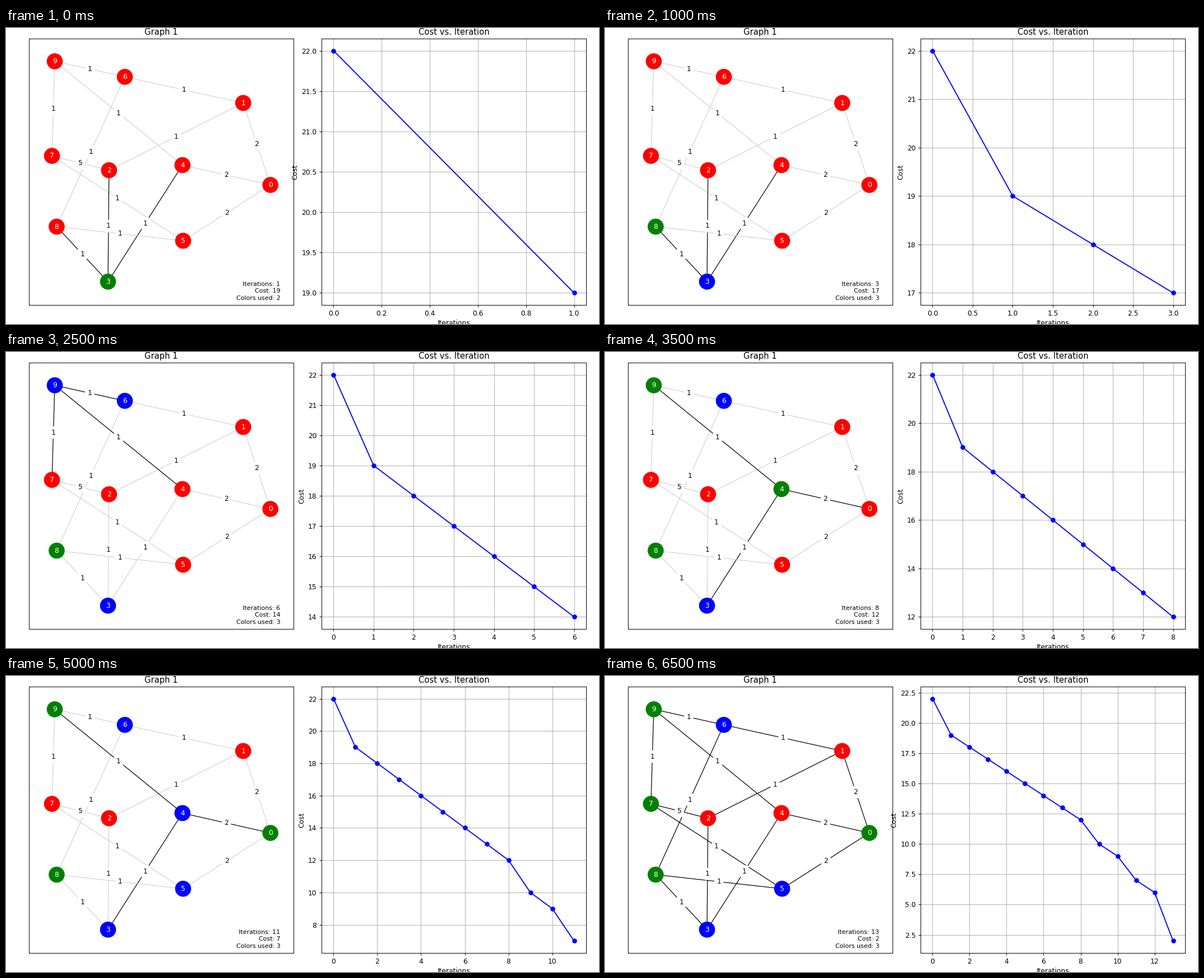
Recreate the animation shown at these times as a matplotlib script. Size 1058 by 529 pixels, loop 7 s.

```python
import matplotlib.pyplot as plt
from matplotlib.animation import FuncAnimation

plt.rcParams["font.family"] = "DejaVu Sans"

WIDTH, HEIGHT = 1058, 529
TOP, BOTTOM = 19, 495
GRAPH_SPAN = (41, 513)
COST_SPAN = (563, 1035)

# Free layout of the ten nodes: key points in stage pixels, y pointing down
NODES = [(471.7, 280.5), (423.2, 134), (183.8, 254.2), (182, 453.3),
         (314.8, 245), (316, 380.2), (212, 87.3), (82, 228.5),
         (90.4, 355), (87, 59.5)]

# Petersen graph: outer ring, spokes and inner star
EDGES = [edge for i in range(5) for edge in
         ((i, (i + 1) % 5), (i, i + 5), (i + 5, (i + 2) % 5 + 5))]

PALETTE = {"r": "red", "g": "green", "b": "blue"}
# One recolouring per iteration: node, then its new colour
MOVES = "3g 8g 3b 6g 6b 9b 9g 4g 0g 5b 4b 4r 7g".split()


def weight(a, b):
    if {a, b} == {2, 7}:
        return 5
    return 2 if 0 in (a, b) else 1


def conflict_cost(colors):
    return sum(weight(a, b) for a, b in EDGES if colors[a] == colors[b])


states = [["red"] * len(NODES)]
for node, key in MOVES:
    colors = list(states[-1])
    colors[int(node)] = PALETTE[key]
    states.append(colors)
costs = [conflict_cost(colors) for colors in states]

fig = plt.figure(figsize=(12, 6), dpi=WIDTH / 12, facecolor="white")


def add_panel(left, right):
    return fig.add_axes([left / WIDTH, 1 - BOTTOM / HEIGHT,
                         (right - left) / WIDTH, (BOTTOM - TOP) / HEIGHT])


graph_ax = add_panel(*GRAPH_SPAN)
cost_ax = add_panel(*COST_SPAN)


def centered_text(x, y, value, **style):
    graph_ax.text(x, y, str(value), fontsize=10,
                  ha="center", va="center", **style)


def draw_graph(iteration, finished):
    ax = graph_ax
    ax.clear()
    ax.set(xlim=GRAPH_SPAN, ylim=(BOTTOM, TOP), xticks=[], yticks=[],
           title="Graph 1")
    colors = states[iteration]
    active = int(MOVES[iteration - 1][0])

    for a, b in EDGES:
        (xa, ya), (xb, yb) = NODES[a], NODES[b]
        lit = finished or active in (a, b)
        ax.plot([xa, xb], [ya, yb], lw=1, zorder=1,
                color="black" if lit else "lightgray")
        centered_text((xa + xb) / 2, (ya + yb) / 2, weight(a, b), zorder=1.5,
                      bbox=dict(boxstyle="round", ec="white", fc="white"))

    ax.scatter(*zip(*NODES), s=500, c=colors, zorder=2)
    for label, (x, y) in enumerate(NODES):
        centered_text(x, y, label, color="white", zorder=3)

    ax.text(0.95, 0.015,
            f"Iterations: {iteration}\nCost: {costs[iteration]}\n"
            f"Colors used: {len(set(colors))}",
            fontsize=9, linespacing=1.3, ha="right", va="bottom",
            transform=ax.transAxes)


def draw_costs(iteration):
    ax = cost_ax
    ax.clear()
    ax.plot(range(iteration + 1), costs[:iteration + 1],
            color="blue", marker="o")
    ax.set(title="Cost vs. Iteration", xlabel="Iterations", ylabel="Cost")
    ax.grid(True)


def draw(frame):
    iteration = min(frame + 1, len(MOVES))
    draw_graph(iteration, finished=frame >= len(MOVES))
    draw_costs(iteration)
    return []


anim = FuncAnimation(fig, draw, frames=len(MOVES) + 1, interval=500,
                     init_func=lambda: draw(0), repeat=True, repeat_delay=0)
plt.show()
```
